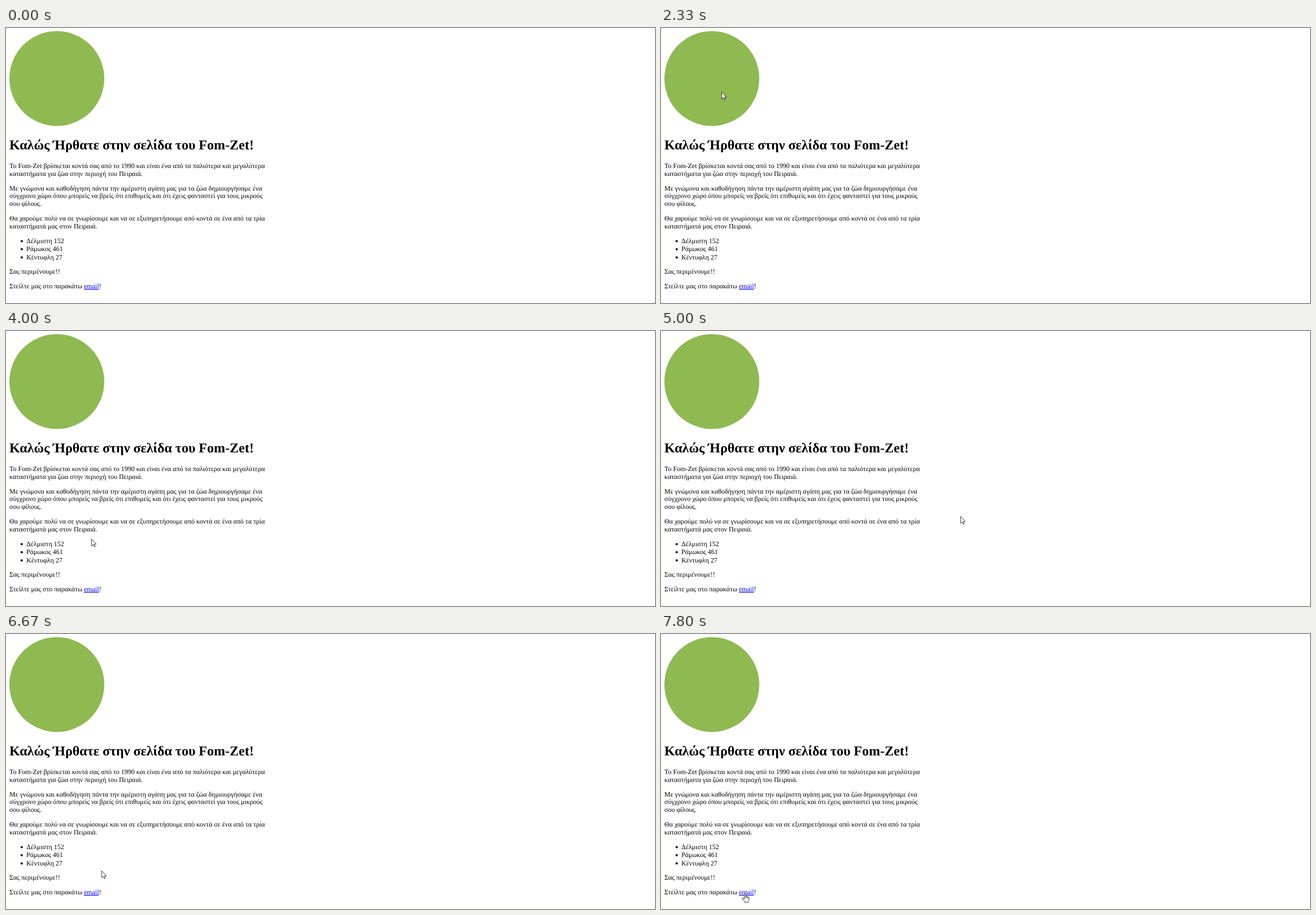
An HTML page that plays this animation: 1149x487 px, repeating every 8 s.

```html
<!DOCTYPE html>
<html lang="el">
<head>
<meta charset="utf-8">
<title>Fom-Zet</title>
<style>
html, body { margin: 0; width: 100%; height: 100%; overflow: hidden; background: #fff; }
svg { display: block; width: 1149px; height: 487px; }
text { font: 12px "Liberation Serif", "Times New Roman", serif; text-rendering: geometricPrecision; white-space: pre; }
.title { font-size: 24px; font-weight: bold; }
.link { fill: #00e; text-decoration: underline; }
.cursor { fill: #fff; stroke: #000; stroke-linejoin: round; }
</style>
</head>
<body>
<svg viewBox="0 0 1149 487">
  <circle cx="90" cy="89.5" r="84" fill="#8fb951"/>
  <g id="page">
    <text class="title" x="6" y="215">Καλώς Ήρθατε στην σελίδα του Fom-Zet!</text>
    <text x="6" y="248">Το Fom-Zet βρίσκεται κοντά σας από το 1990 και είναι ένα από τα παλιότερα και μεγαλύτερα</text>
    <text x="6" y="262">καταστήματα για ζώα στην περιοχή του Πειραιά.</text>
    <text x="6" y="287.5">Με γνώμονα και καθοδήγηση πάντα την αμέριστη αγάπη μας για τα ζώα δημιουργήσαμε ένα</text>
    <text x="6" y="301.3">σύγχρονο χώρο όπου μπορείς να βρείς ότι επιθυμείς και ότι έχεις φανταστεί για τους μικρούς</text>
    <text x="6" y="315">σου φίλους.</text>
    <text x="6" y="341">Θα χαρούμε πολύ να σε γνωρίσουμε και να σε εξυπηρετήσουμε από κοντά σε ένα από τα τρία</text>
    <text x="6" y="354.7">καταστήματά μας στον Πειραιά.</text>
    <text x="36" y="381">Δέλμιστη 152</text>
    <text x="36" y="395.3">Ράμωκος 461</text>
    <text x="36" y="409.7">Κέντυφλη 27</text>
    <text x="6" y="435">Σας περιμένουμε!!</text>
    <text x="6" y="461">Στείλτε μας στο παρακάτω <tspan class="link">email</tspan>!</text>
  </g>
  <circle cx="27.8" cy="377.5" r="2"/>
  <circle cx="27.8" cy="391.8" r="2"/>
  <circle cx="27.8" cy="406.2" r="2"/>
  <g id="pointer">
    <path id="arrow" class="cursor" transform="scale(.77)" d="M.6.6V16.4L4.3 13L6.7 18.6L9 17.6L6.7 12.2H11.4Z"/>
    <path id="beam" fill="none" stroke="#000" d="M-2-5.5H3M.5-6V7M-2 6.5H3"/>
    <g id="hand" class="cursor" transform="scale(.76) translate(-7.5 0)">
      <path d="M5.5 14V2Q5.5.5 7 .5T8.5 2V7.5Q11.3 5.8 11.3 8.5Q14 7 14 9.3Q16.5 8.5 16.5 11V15Q16.5 18 14.5 19V21.5H6.5V19.5L1 13.5Q0 11.5 2 11Q3.5 11 5.5 14Z"/>
      <path fill="none" d="M8.5 7.5V11M11.3 8.5V11.5M14 9.3V12"/>
    </g>
  </g>
</svg>
<script>
const LOOP = 8000, STEP = 200 / 3;
const get = id => document.getElementById(id);
const pointer = get('pointer');
const kinds = ['arrow', 'beam', 'hand'];

// Pointer stops: time in ms, x, y
const path = [
  [0, 1148, 486], [199, 1148, 486],
  [930, 892, 480], [1200, 557, 449], [1333, 376, 395], [1533, 500, 310], [1730, 638, 258],
  [1870, 656, 231], [2067, 656, 231], [2200, 390, 160], [2330, 108, 112],
  [2467, 85, 150], [2667, 100, 250], [2930, 144, 335], [3133, 160, 366], [3330, 175, 389],
  [3667, 175, 389], [3730, 174, 387], [3933, 174, 387], [4000, 151, 368], [4070, 129, 352],
  [4267, 129, 352], [4330, 129, 353], [4400, 129, 353], [4600, 175, 372], [4800, 390, 352],
  [5000, 530, 328], [5867, 530, 328], [6133, 330, 368], [6467, 154, 396], [6670, 169, 419],
  [6730, 176, 426], [6933, 193, 448], [7133, 184, 470], [7400, 160, 467],
  [7600, 147, 462], [7733, 148, 459], [7800, 149, 459], [8000, 149, 459]
];

function place(t) {
  const i = path.findIndex(p => p[0] > t);
  const [t0, x0, y0] = path[i - 1], [t1, x1, y1] = path[i];
  const k = (t - t0) / (t1 - t0);
  return [Math.round(x0 + (x1 - x0) * k), Math.round(y0 + (y1 - y0) * k)];
}

const lines = [...document.querySelectorAll('#page text')].map(el => {
  const x = +el.getAttribute('x'), y = +el.getAttribute('y');
  const size = el.classList.contains('title') ? 24 : 12;
  return { left: x, right: x + el.getComputedTextLength(), top: y - size * .9, bottom: y + size * .25 };
});

function kindAt(x, y) {
  const line = lines.find(l => x >= l.left && x < l.right && y >= l.top && y < l.bottom);
  if (!line) return 'arrow';
  return line === lines[lines.length - 1] && x > 137 && x < 165 ? 'hand' : 'beam';
}

function draw(now) {
  // The pointer is sampled 15 times a second
  const t = Math.floor((now % LOOP + 4) / STEP) * STEP % LOOP;
  const away = t >= 199 && t < 930;
  pointer.style.display = away ? 'none' : '';
  if (!away) {
    const [x, y] = place(t), kind = kindAt(x, y);
    pointer.setAttribute('transform', `translate(${x} ${y})`);
    for (const id of kinds) get(id).style.display = id === kind ? '' : 'none';
  }
  requestAnimationFrame(() => draw(performance.now() - start));
}

const start = performance.now();
draw(0);
</script>
</body>
</html>
```
